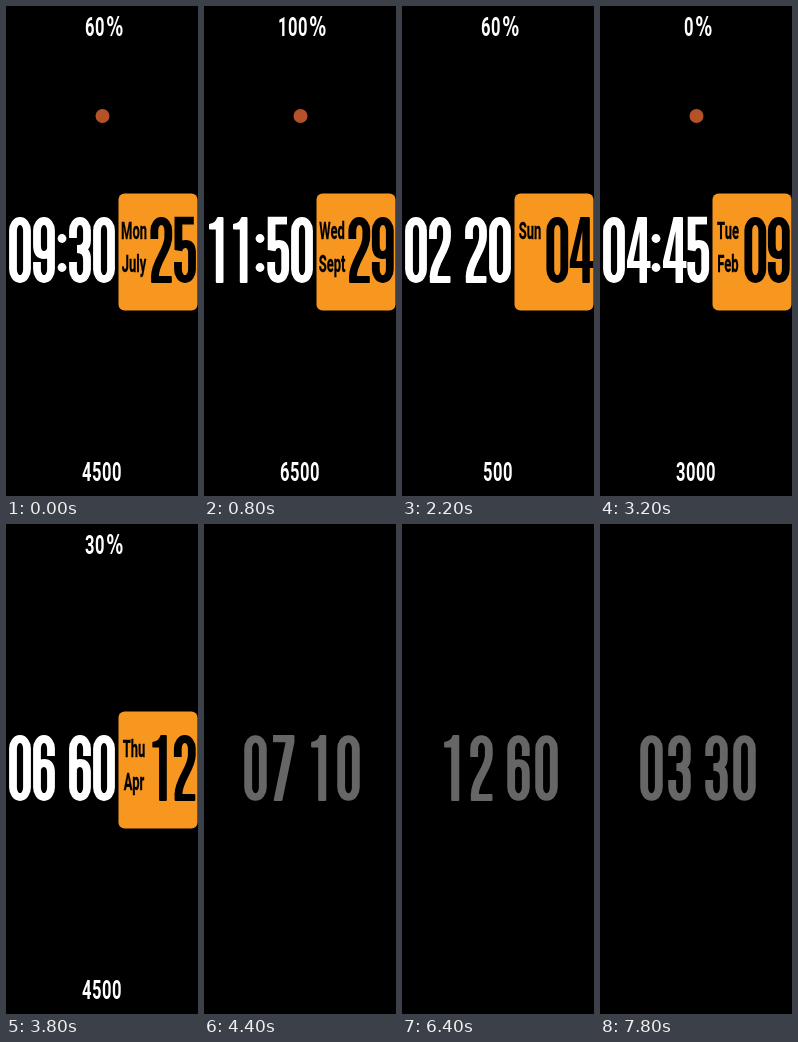
An HTML page for the animation above (8 s loop, 192 by 490 pixels).

```html
<!DOCTYPE html>
<html lang="en">
<head>
<meta charset="utf-8">
<title>Watch face</title>
<style>
  html, body { margin: 0; width: 100%; height: 100%; overflow: hidden; background: #000; }
  svg { display: block; width: 192px; height: 490px; }
  text { font-family: Roboto, "Open Sans", sans-serif; font-weight: 700; text-anchor: middle; }
  .num { font-size: 26.7px; font-weight: 600; letter-spacing: .8px; fill: #fff; }
  .sign { font-family: "DejaVu Sans", sans-serif; }
  .word { font-size: 24.5px; fill: #000; stroke: #000; stroke-width: .3; }
  .digits { stroke-width: 7.8; }
  .time { color: #fff; }
  .date { color: #000; }
  .dim { color: #666; stroke-width: 7.5; }
</style>
</head>
<body>
<svg viewBox="0 0 192 490" role="img">
  <defs id="glyphs"></defs>
  <g id="active">
    <g transform="translate(98.3 30) scale(.62 1)"><text class="num"><tspan id="battery"></tspan><tspan class="sign" dx="2.6">%</tspan></text></g>
    <circle id="link" cx="96.5" cy="110" r="7" fill="#b5522a"/>
    <rect x="112.5" y="187.5" width="79" height="117" rx="6" fill="#f8971f"/>
    <g class="digits time" id="time"></g>
    <g id="colon" fill="#fff"><circle cx="56" cy="232.5" r="4.4"/><circle cx="56" cy="261.5" r="4.4"/></g>
    <g transform="translate(128 233) scale(.53 1)"><text class="word" id="weekday"></text></g>
    <g transform="translate(128 266) scale(.53 1)"><text class="word" id="month"></text></g>
    <g class="digits date" id="day"></g>
    <g transform="translate(96 475) scale(.62 1)"><text class="num" id="steps"></text></g>
  </g>
  <g class="digits dim" id="idle"></g>
</svg>
<script>
const NS = 'http://www.w3.org/2000/svg';
const $ = id => document.getElementById(id);
const STEP = 200, COUNT = 40, ACTIVE = 20;

// Digits in a 22 x 66 cell: [stroked outline, filled outline]
const GLYPHS = [
  ['M4 13.5V52.5a7 9.5 0 0 0 14 0V13.5a7 9.5 0 0 0-14 0z', ''],
  ['', 'M15.5 0q1 0 1 1V65q0 1-1 1H9.8q-1 0-1-1V12.5H3q-1 0-1-1V7.8q0-1 1-1.1C7 6.2 9 4 10 .8q.3-.8 1-.8z'],
  ['M4 22V13.5a7 9.5 0 0 1 14 0V20C18 34 4.6 44 4.6 60', 'M.8 59H20.5q1 0 1 1V65q0 1-1 1H1.8q-1 0-1-1z'],
  ['M4 21V13.5a7 9.5 0 0 1 14 0V23q0 9-9 9M8 32q10 0 10 10V52.5a7 9.5 0 0 1-14 0V45', ''],
  ['', 'M10.5 0H19q1 0 1 1V44H23.5V51H20V65q0 1-1 1H13.5q-1 0-1-1V51H0V44zM12.5 14L6.5 44H12.5z'],
  ['M20 3.6H4.6V33q2-6 7-6 6.6 0 6.6 9V52.5a7 9.5 0 0 1-14 0V45', ''],
  ['M18 21V13.5a7 9.5 0 0 0-14 0V52.5a7 9.5 0 0 0 14 0V38q0-10-7-10-5 0-7 6', ''],
  ['', 'M1 0H20.5q1 0 1 1V7L10 65q-.2 1-1.2 1H2.6q-1.2 0-1-1L13 7.2H1z'],
  ['M4 13.5a7 9.5 0 0 1 14 0V22a7 9.5 0 0 1-14 0zM4 41a7 9.5 0 0 1 14 0V52.5a7 9.5 0 0 1-14 0z', ''],
  ['M4 45V52.5a7 9.5 0 0 0 14 0V13.5a7 9.5 0 0 0-14 0V28q0 10 7 10 5 0 7-6', '']
];
const WEEKDAYS = ['Mon', 'Tue', 'Wed', 'Thu', 'Fri', 'Sat', 'Sun'];
const MONTHS = ['', 'Jan', 'Feb', 'Mar', 'Apr', 'May', 'June', 'July', 'Aug', 'Sept', 'Oct', 'Nov', 'Dec'];

function add(parent, tag, attrs) {
  const el = document.createElementNS(NS, tag);
  for (const key in attrs) el.setAttribute(key, attrs[key]);
  return parent.appendChild(el);
}

GLYPHS.forEach(([line, solid], i) => {
  const g = add($('glyphs'), 'g', { id: 'd' + i });
  if (line) add(g, 'path', { d: line, fill: 'none', stroke: 'currentColor' });
  if (solid) add(g, 'path', { d: solid, fill: 'currentColor', 'fill-rule': 'evenodd' });
});

function digitRow(id, lefts, widen = 1) {
  const row = $(id);
  const cells = lefts.map(x => add(row, 'use', { transform: `translate(${x} 211) scale(${widen} 1)` }));
  return value => {
    row.setAttribute('aria-label', value);
    cells.forEach((cell, i) => cell.setAttribute('href', '#d' + value[i]));
  };
}

const setTime = digitRow('time', [3, 27, 63, 87]);
const setDay = digitRow('day', [144.3, 167.8]);
const setIdle = digitRow('idle', [40, 68, 105, 133], 1.045);

const pad = n => String(n).padStart(2, '0');
const show = (id, on) => $(id).setAttribute('visibility', on ? 'visible' : 'hidden');

function draw(k) {
  const active = k < ACTIVE, half = Math.ceil(k / 2);
  const time = pad((9 + half) % 13) + pad((30 + 5 * k) % 65);
  $('active').style.display = active ? '' : 'none';
  $('idle').style.display = active ? 'none' : '';
  setTime(time);
  setIdle(time);
  setDay(pad((25 + k) % 32));
  $('battery').textContent = (60 + 10 * k) % 110;
  $('steps').textContent = (4500 + 500 * k) % 9500;
  $('weekday').textContent = WEEKDAYS[half % 7];
  $('month').textContent = MONTHS[(7 + half) % 13];
  show('link', k % 2 === 0);
  show('colon', k % 2 === 0);
}

let start, last = -1;
function tick(now) {
  start ??= now;
  const k = Math.floor((now - start) / STEP) % COUNT;
  if (k !== last && k >= 0) draw(last = k);
  requestAnimationFrame(tick);
}
draw(0);
requestAnimationFrame(tick);
</script>
</body>
</html>
```
